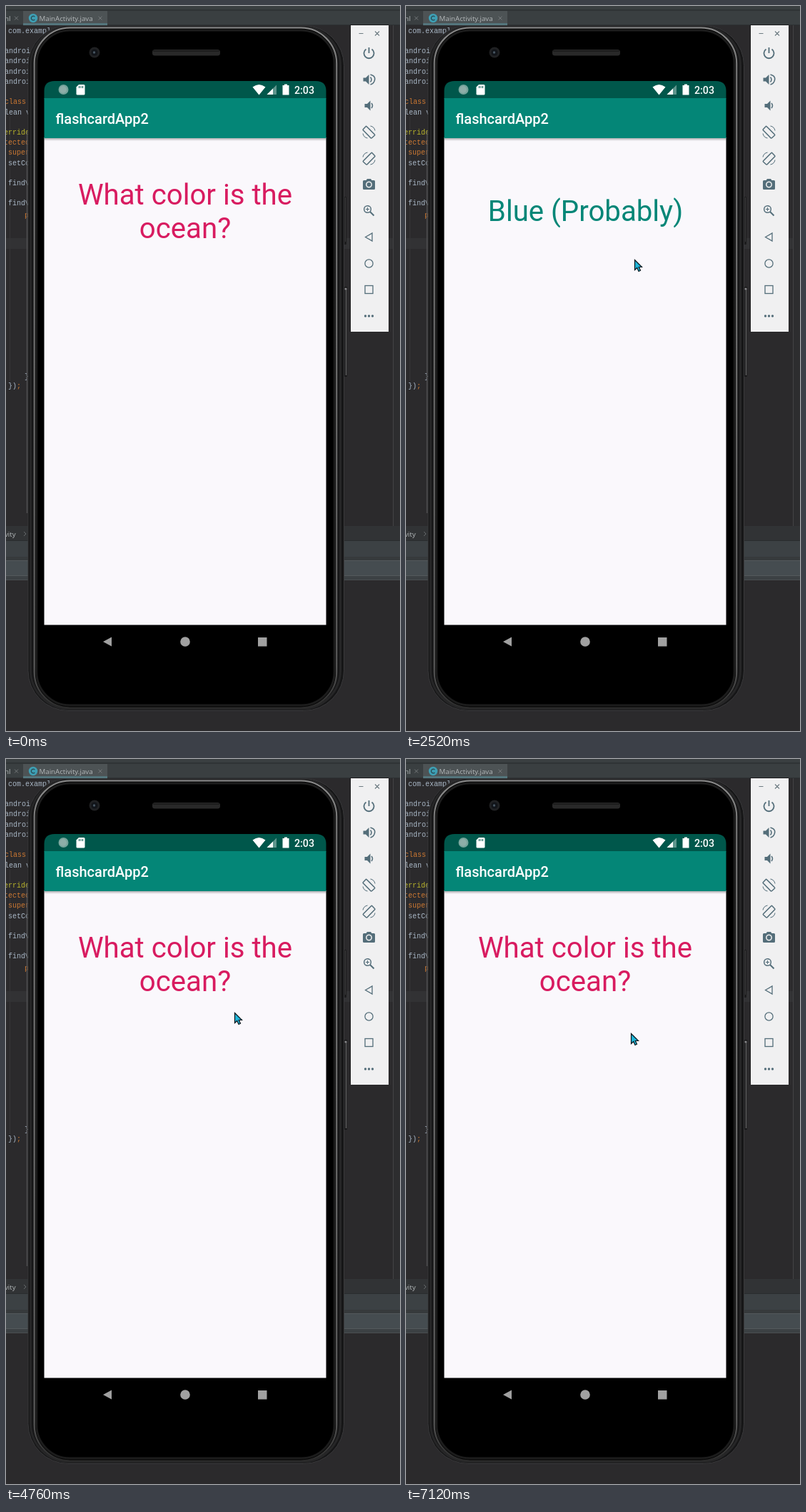
An HTML page that plays this animation: 552 px wide and 1015 px high, repeating every 7.2 s.

```html
<!DOCTYPE html>
<html lang="en">
<head>
<meta charset="utf-8">
<title>Flashcard</title>
<style>
html, body { margin: 0; width: 100%; height: 100%; overflow: hidden; background: #2b2a2c; }
svg { display: block; width: 552px; height: 1015px; }
text { white-space: pre; }
.code { font: 10px "Liberation Mono", monospace; fill: #a9b7c6; }
.ui { font: 9.7px "Open Sans", sans-serif; fill: #b4b9bb; }
.med { font-family: Roboto, sans-serif; font-weight: 500; fill: #fff; }
.card { font: 40.2px Roboto, sans-serif; text-anchor: middle; }
.icon { fill: none; stroke: #546e7a; stroke-width: 1.5; }
.solid { fill: #546e7a; stroke: none; }
</style>
</head>
<body>
<svg viewBox="0 0 552 1015">
  <defs>
    <linearGradient id="rim" x1="0" y1="0" x2="0" y2="1">
      <stop offset="0" stop-color="#8c8c8c"/>
      <stop offset=".06" stop-color="#757575"/>
      <stop offset=".5" stop-color="#6c6c6c"/>
      <stop offset=".94" stop-color="#585858"/>
      <stop offset="1" stop-color="#2a2a2a"/>
    </linearGradient>
    <linearGradient id="shade" x1="0" y1="0" x2="0" y2="1">
      <stop offset="0" stop-color="#000" stop-opacity=".3"/>
      <stop offset="1" stop-color="#000" stop-opacity="0"/>
    </linearGradient>
    <g id="turn">
      <path d="M-3.200-7.800L7.800 3.200Q8.500 4 7.800 4.700L4 8.200Q3.200 8.800 2.500 8.200L-8 -2.500Q-8.700-3.200-8-4L-4.500-7.800Q-3.900-8.400-3.200-7.800Z"/>
      <path d="M2-8.500Q7.500-7.500 8.500-2M-2 8.500Q-7.500 7.500-8.500 2" stroke-width="1"/>
    </g>
  </defs>

  <!-- editor window -->
  <rect width="552" height="1015" fill="#2b2a2c"/>
  <rect width="552" height="27" fill="#3a3f41"/>
  <rect y="5" width="552" height="1.5" fill="#2c3032"/>
  <rect x="24" y="7" width="118" height="20" fill="#4d5355"/>
  <rect x="24" y="24" width="118" height="3" fill="#54757c"/>
  <rect y="26" width="24" height="1" fill="#2c3032"/>
  <rect x="142" y="26" width="410" height="1" fill="#2c3032"/>
  <text class="ui" x="-5" y="20.5">ml</text>
  <circle cx="38" cy="17" r="6.2" fill="#3e9fb4"/>
  <path d="M40.3 15.2a2.8 2.8 0 1 0 0 3.6" fill="none" stroke="#294a53" stroke-width="1.3"/>
  <text class="ui" x="46.5" y="20.5">MainActivity.java</text>
  <path d="M12 14.5l5 5m0-5l-5 5M129.5 14.5l5 5m0-5l-5 5" stroke="#737779"/>
  <rect y="325" width="552" height="15" fill="#323234"/>
  <path d="M5.5 155V525" stroke="#363638"/>
  <path d="M542.5 27V728" stroke="#434345"/>
  <rect x="543" y="27" width="9" height="701" fill="#2d2d2f"/>
  <g id="code"></g>
  <rect y="728" width="552" height="20" fill="#313335"/>
  <text class="ui" x="-2" y="743">vity</text>
  <path d="M25 736l3 3-3 3" fill="none" stroke="#666a6c"/>
  <rect y="748" width="552" height="56" fill="#3c4144"/>
  <rect y="748" width="552" height="1" fill="#292c2e"/>
  <rect y="771" width="552" height="6" fill="#363a3c"/>
  <rect y="777" width="552" height="20" fill="#454c50"/>
  <path d="M0 776.5H552M0 797.5H552" stroke="#54595c"/>
  <rect y="803" width="552" height="1" fill="#4a4e50"/>

  <!-- phone -->
  <path d="M29.5 175V710" stroke="#505052" stroke-width="1.5"/>
  <rect x="473" y="267" width="4" height="67" rx="1" fill="#1c1c1d"/>
  <path d="M475.5 268V330" stroke="#3d3d3e"/>
  <rect x="473" y="393" width="5" height="126" rx="1" fill="#19191a"/>
  <path d="M476.5 396V517" stroke="#606062" stroke-width="1.5"/>
  <circle cx="476" cy="396" r="1.5" fill="#8a8a8c"/>
  <rect x="31" y="27.5" width="442.5" height="959" rx="56" fill="#161617" stroke="#39393b"/>
  <rect x="34.5" y="29" width="434" height="955" rx="54" fill="none" stroke="#262627" stroke-width="3"/>
  <rect x="39.7" y="30.5" width="423.5" height="952" rx="50" fill="#000" stroke="url(#rim)" stroke-width="2.2"/>
  <rect x="42.7" y="34" width="417.500" height="945" rx="47" fill="#000" stroke="#1c1c1c" stroke-width="3"/>
  <circle cx="124" cy="65" r="7.5" fill="#202123"/>
  <circle cx="124" cy="65" r="4.5" fill="#111419"/>
  <circle cx="123.500" cy="65" r="1.7" fill="#465460"/>
  <rect x="205" y="61" width="95" height="8.5" rx="3.5" fill="#292929"/>
  <rect x="206" y="62" width="93" height="2" rx="1" fill="#1c1c1c"/>

  <!-- app screen -->
  <rect x="53.5" y="184" width="395" height="682.5" fill="#faf8fc"/>
  <path d="M53.5 130V119Q53.5 105 68 105H434Q448.5 105 448.5 119V130Z" fill="#00574b"/>
  <rect x="53.5" y="129" width="395" height="56" fill="#048677"/>
  <rect x="53.5" y="185" width="395" height="4" fill="url(#shade)"/>
  <circle cx="80.500" cy="117" r="7" fill="#76a49b"/>
  <circle cx="80" cy="117" r="5" fill="#8eaea8"/>
  <path d="M102 110H109Q110.5 110 110.5 111.5V123Q110.5 124.5 109 124.5H100Q98.5 124.5 98.5 123V113.5Z" fill="#fff"/>
  <path d="M102.5 112v3m2.5-3v3m2.5-3v3" stroke="#00574b"/>
  <path d="M345.5 113.5Q354.5 106.5 363.5 113.5L354.5 124.5Z" fill="#fff"/>
  <path d="M379 110.5V124H365.5Z" fill="#5f958d"/>
  <path d="M374 115.5V124H365.5Z" fill="#fff"/>
  <path d="M390 109.5h4v1.5h2.5v13.5h-9V111h2.5Z" fill="#fff"/>
  <text class="med" x="404" y="122.5" font-size="14.2">2:03</text>
  <text class="med" x="69.5" y="165" font-size="20">flashcardApp2</text>
  <g id="ask" class="card" fill="#d81b60">
    <text x="251" y="278">What color is the</text>
    <text x="251" y="325">ocean?</text>
  </g>
  <text id="reply" class="card" x="251.5" y="301" fill="#048677">Blue (Probably)</text>
  <g fill="#a1a1a1">
    <path d="M136 890l12-6.5v13Z"/>
    <circle cx="251" cy="890" r="6.8"/>
    <rect x="353" y="884" width="12.5" height="12.5"/>
  </g>

  <!-- emulator controls -->
  <rect x="482" y="26" width="54" height="430" fill="#1b1b1d"/>
  <rect x="483" y="27" width="53" height="429" fill="#f0f0f1"/>
  <path d="M494.5 38.5h6M517 35.5l6 6m0-6l-6 6" stroke="#6d7b82" stroke-width="1.1"/>
  <g class="icon" transform="translate(508.5 0)">
    <path d="M0 58V66M-4 60.5a7 7 0 1 0 8 0" stroke-width="1.8"/>
    <path class="solid" d="M-8 100.5h3.5l4.500-4.5v14l-4.5-4.5h-3.5Z"/>
    <path d="M2 99.5q3 3.5 0 7M2 96q8.5 2 5.5 9.5q-1.5 3.5-5.5 4.5"/>
    <path class="solid" d="M-6 137h3.5l4.500-4.5v14l-4.5-4.5h-3.5Z"/>
    <path d="M3.5 136q3 3.5 0 7"/>
    <use href="#turn" transform="translate(0 176.5)"/>
    <use href="#turn" transform="translate(0 213.5) scale(-1 1)"/>
    <path class="solid" d="M-7 244h3l1.5-2h5l1.5 2h3q1.500 0 1.500 1.500v10q0 1.500-1.500 1.500h-14q-1.500 0-1.500-1.500v-10q0-1.500 1.500-1.500Z"/>
    <circle cy="250" r="3.7" fill="#546e7a" stroke="#f0f0f1"/>
    <circle cx="-2" cy="284.5" r="4.8"/>
    <path d="M1.5 288l5.5 5.5" stroke-width="2"/>
    <path d="M-4.5 284.5h5M-2 282v5" stroke-width="1.1"/>
    <path d="M-5 323.5l9.5-5.5v11Z" stroke-width="1.3"/>
    <circle cy="360.5" r="5.6" stroke-width="1.3"/>
    <rect x="-5.5" y="391.5" width="11" height="11" stroke-width="1.3"/>
    <g class="solid"><circle cx="-5" cy="434" r="1.7"/><circle cy="434" r="1.7"/><circle cx="5" cy="434" r="1.7"/></g>
  </g>

  <path id="pointer" d="M.5.5V14.5L3.7 11.5L6 16.5L8.5 15.3L6.3 10.5H10.5Z" fill="#20b5d8" stroke="#08141a" stroke-width="1.2"/>
</svg>
<script>
const LOOP = 7200, STEP = 40;
const el = id => document.getElementById(id);
const ORANGE = "#cc7832", YELLOW = "#bbb529";

// x, baseline, text, colour
const code = [
  [3, 38, "com.exampl"],
  [-2, 66, "androi"], [-2, 80, "androi"], [-2, 95, "androi"], [-2, 109, "androi"],
  [-2, 137, "class", ORANGE], [-2, 152, "lean v"],
  [-3, 180, "erride", YELLOW], [-3, 194, "tected", ORANGE],
  [3, 208, "super", ORANGE], [3, 223, "setCo"],
  [3, 251, "findV"], [3, 279, "findV"],
  [26, 296, "p", ORANGE], [26, 522, "}"], [3, 535, "})"], [15, 535, ";", ORANGE]
];
for (const [x, y, text, fill] of code) {
  const t = document.createElementNS("http://www.w3.org/2000/svg", "text");
  t.setAttribute("class", "code");
  t.setAttribute("x", x);
  t.setAttribute("y", y);
  if (fill) t.style.fill = fill;
  t.textContent = text;
  el("code").append(t);
}

// time, x, y of the pointer tip
const path = [
  [320, 546, 640], [920, 322, 365], [1120, 322, 365], [1720, 309, 326],
  [2000, 309, 326], [2360, 320, 355], [6440, 320, 355], [6880, 315, 384]
];
const flips = [2480, 3520, 5120, 6200];

function pointerAt(t) {
  const i = path.findIndex(p => p[0] > t);
  if (i < 0) return path[path.length - 1].slice(1);
  const [t0, x0, y0] = path[i - 1], [t1, x1, y1] = path[i];
  const u = (t - t0) / (t1 - t0), k = u * u * (3 - 2 * u);
  return [x0 + (x1 - x0) * k, y0 + (y1 - y0) * k];
}

function show(id, on) {
  el(id).setAttribute("visibility", on ? "visible" : "hidden");
}

function draw(ms) {
  const t = Math.floor(ms % LOOP / STEP) * STEP;
  const answered = flips.filter(f => f <= t).length % 2 === 1;
  show("ask", !answered);
  show("reply", answered);
  const seen = t >= path[0][0];
  show("pointer", seen);
  if (seen) {
    const [x, y] = pointerAt(t).map(Math.round);
    el("pointer").setAttribute("transform", `translate(${x} ${y})`);
  }
}

const start = performance.now();
function tick() {
  draw(performance.now() - start);
  requestAnimationFrame(tick);
}
tick();
</script>
</body>
</html>
```
